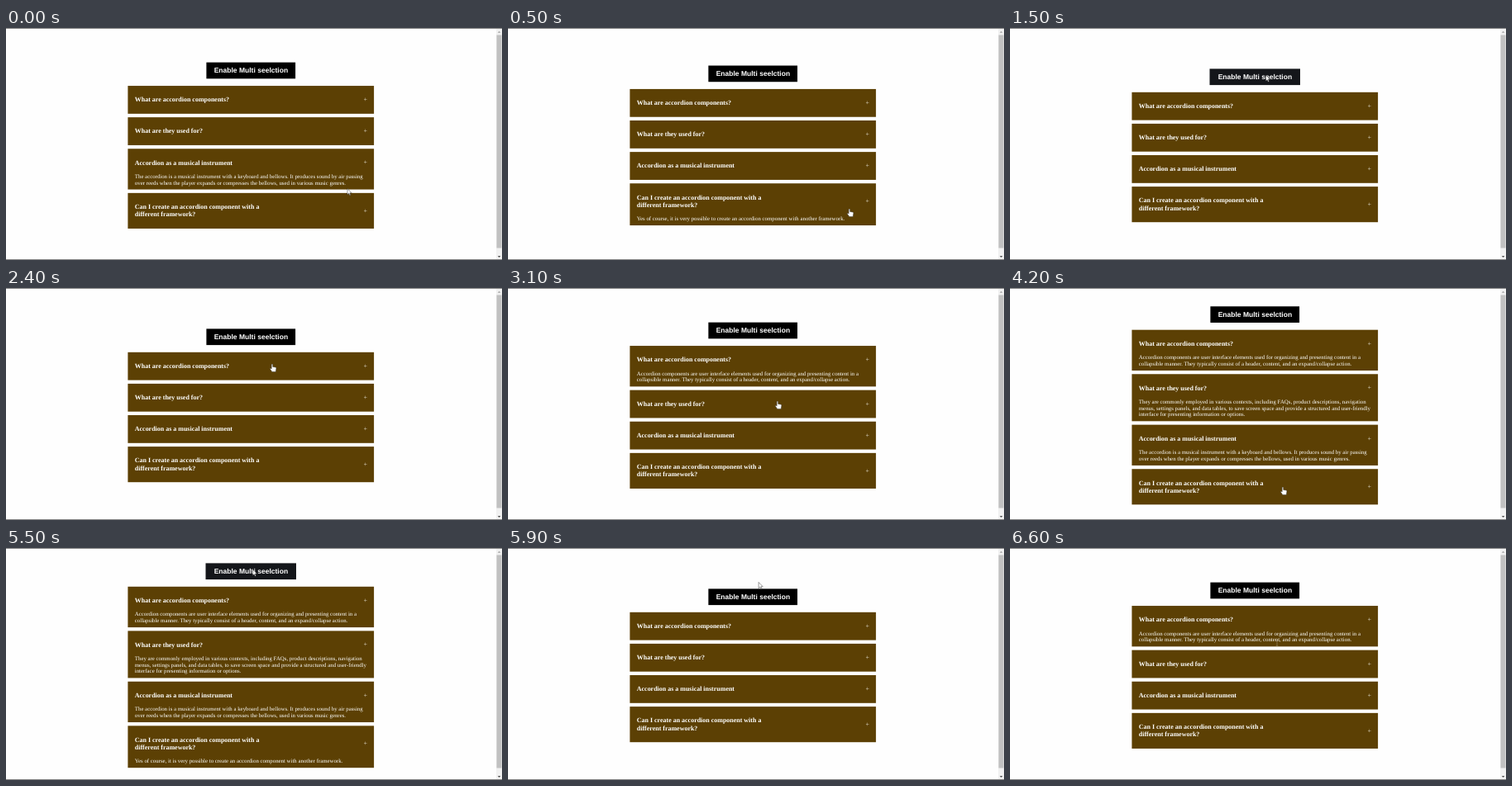
Animation of 600x281 px, one loop 6.7 s. Source, as an HTML page:

```html
<!DOCTYPE html>
<html lang="en">
<head>
<meta charset="utf-8">
<title>Accordion</title>
<style>
  html, body { margin: 0; width: 100%; height: 100%; overflow: hidden; background: #fefefe; }
  svg { display: block; width: 100vw; height: 100vh; }
  text { fill: #fff; text-rendering: geometricPrecision; }
  .title { font: bold 7.98px "Liberation Serif", "Times New Roman", serif; }
  .body { font: 6.83px "Liberation Serif", "Times New Roman", serif; }
  .plus { font: 8px "Liberation Serif", "Times New Roman", serif; fill: #e4ded2; text-anchor: middle; }
  .button { font: bold 8.52px "Liberation Sans", Arial, sans-serif; text-anchor: middle; }
</style>
</head>
<body>
<svg id="stage" viewBox="0 0 600 281"></svg>
<script>
const LOOP = 6700, STEP = 100;
const LINE = 7.75, GAP = 4.3, HEADER = 33.8, BODY_TOP = 29.5, BUTTON_H = 19.7;

const items = [
  { title: ["What are accordion components?"],
    body: ["Accordion components are user interface elements used for organizing and presenting content in a",
           "collapsible manner. They typically consist of a header, content, and an expand/collapse action."] },
  { title: ["What are they used for?"],
    body: ["They are commonly employed in various contexts, including FAQs, product descriptions, navigation",
           "menus, settings panels, and data tables, to save screen space and provide a structured and user-friendly",
           "interface for presenting information or options."] },
  { title: ["Accordion as a musical instrument"],
    body: ["The accordion is a musical instrument with a keyboard and bellows. It produces sound by air passing",
           "over reeds when the player expands or compresses the bellows, used in various music genres."] },
  { title: ["Can I create an accordion component with a", "different framework?"],
    body: ["Yes of course, it is very possible to create an accordion component with another framework."] }
];

// Which panels are open from each time on
const states = [
  [0, [2]], [400, [3]], [1500, []], [2500, [0]], [3300, [0, 1]],
  [3800, [0, 1, 2]], [4500, [0, 1, 2, 3]], [5600, []], [6500, [0]]
];

// Pointer stops: time, x, y
const path = [
  [0, 413, 194.5], [300, 413, 219], [600, 413, 219], [1400, 309.5, 57], [1800, 309.5, 57],
  [2400, 322, 92], [2600, 322, 92], [3000, 326, 137], [3300, 326, 137], [3700, 328, 190],
  [3900, 328, 190], [4200, 330, 241], [4600, 330, 241], [5300, 298.5, 26], [5700, 298.5, 26],
  [6400, 322, 104], [6600, 323, 115.5], [6700, 323, 115.5]
];

const stage = document.getElementById("stage");

function add(parent, tag, attrs = {}, content) {
  const node = document.createElementNS("http://www.w3.org/2000/svg", tag);
  for (const key in attrs) node.setAttribute(key, attrs[key]);
  if (content) node.textContent = content;
  parent.appendChild(node);
  return node;
}
const rect = (parent, x, y, width, height, fill) => add(parent, "rect", { x, y, width, height, fill });
const move = (node, x, y) => node.setAttribute("transform", `translate(${x} ${y})`);
const show = (node, on) => node.setAttribute("visibility", on ? "visible" : "hidden");

// Window edges and scrollbar
rect(stage, 0, 0, 600, 281, "#fefefe");
rect(stage, 593, 1, 7, 279, "#f1f1f1");
rect(stage, 593.5, 8.5, 6, 258, "#c1c1c1");
add(stage, "path", { d: "M594.8 5.8l1.8-2 1.8 2z", fill: "#a3a3a3" });
add(stage, "path", { d: "M594.8 276l1.8 2 1.8-2z", fill: "#505050" });
rect(stage, 0, 0, 600, 1, "#858585");
rect(stage, 0, 280, 600, 1, "#858585");

const button = add(stage, "g");
const buttonBox = rect(button, 242.4, 0, 107.7, BUTTON_H, "#000");
add(button, "text", { class: "button", x: 296.4, y: 12.7 }, "Enable Multi seelction");

for (const item of items) {
  const extra = (item.title.length - 1) * 9.3;
  item.header = HEADER + extra;
  item.bodyTop = BODY_TOP + extra;
  item.group = add(stage, "g");
  item.box = rect(item.group, 147.4, 0, 297.7, item.header, "#5c4004");
  item.title.forEach((line, i) =>
    add(item.group, "text", { class: "title", x: 155.8, y: 19.3 + i * 9.3 }, line));
  add(item.group, "text", { class: "plus", x: 434.7, y: 19.1 + extra / 2 }, "+");
  item.text = add(item.group, "g");
  item.body.forEach((line, i) =>
    add(item.text, "text", { class: "body", x: 155.8, y: item.bodyTop + 6 + i * LINE }, line));
}

// Each pointer has its hot spot at 0,0
const pointers = {
  arrow: add(stage, "path", {
    d: "M0 0V7.2L1.7 5.7 2.8 8.2 3.9 7.7 2.8 5.3H5.1Z",
    fill: "#fff", stroke: "#222", "stroke-width": 0.45 }),
  hand: add(stage, "path", {
    d: "M-.8 .6Q0-.5 .7 .6V3.4L4.2 4.1Q5 4.4 4.9 5.3L4.3 9.4H-.2L-2.6 6Q-2.8 4.9-1.8 5.2L-.8 6Z",
    fill: "#fff", stroke: "#222", "stroke-width": 0.4 }),
  beam: add(stage, "path", {
    d: "M-1.4-3.3H1.4M0-3.3V3.3M-1.4 3.3H1.4",
    fill: "none", stroke: "#a99c84", "stroke-width": 0.5 })
};

function pointerAt(time) {
  const next = Math.max(1, path.findIndex(stop => stop[0] >= time));
  const [t0, x0, y0] = path[next - 1], [t1, x1, y1] = path[next];
  const u = (time - t0) / (t1 - t0), k = u * u * (3 - 2 * u);
  return [x0 + (x1 - x0) * k, y0 + (y1 - y0) * k];
}

function render(time) {
  const open = states.filter(s => s[0] <= time).pop()[1];
  const lines = open.reduce((sum, i) => sum + items[i].body.length, 0);
  const top = 49.4 - lines * LINE / 2;
  const [px, py] = pointerAt(time);
  let kind = "arrow";

  const hover = px > 242 && px < 350 && py > top && py < top + BUTTON_H;
  move(button, 0, top);
  buttonBox.setAttribute("x", hover ? 241.5 : 242.4);
  buttonBox.setAttribute("width", hover ? 109.5 : 107.7);
  buttonBox.setAttribute("fill", hover ? "#14161a" : "#000");

  let y = top + 28.4;
  items.forEach((item, i) => {
    const isOpen = open.includes(i);
    const textHeight = isOpen ? item.body.length * LINE : 0;
    const height = item.header + textHeight;
    move(item.group, 0, y);
    item.box.setAttribute("height", height);
    show(item.text, isOpen);
    const local = py - y;
    if (local > 0 && local < (isOpen ? item.bodyTop : height)) kind = "hand";
    else if (isOpen && local >= item.bodyTop && local < item.bodyTop + textHeight + 1) kind = "beam";
    y += height + GAP;
  });

  for (const name in pointers) show(pointers[name], name === kind);
  move(pointers[kind], px, py);
}

const start = performance.now();
function tick() {
  const time = (performance.now() - start) % LOOP;
  render(Math.floor(time / STEP) * STEP);
  requestAnimationFrame(tick);
}
tick();
</script>
</body>
</html>
```
